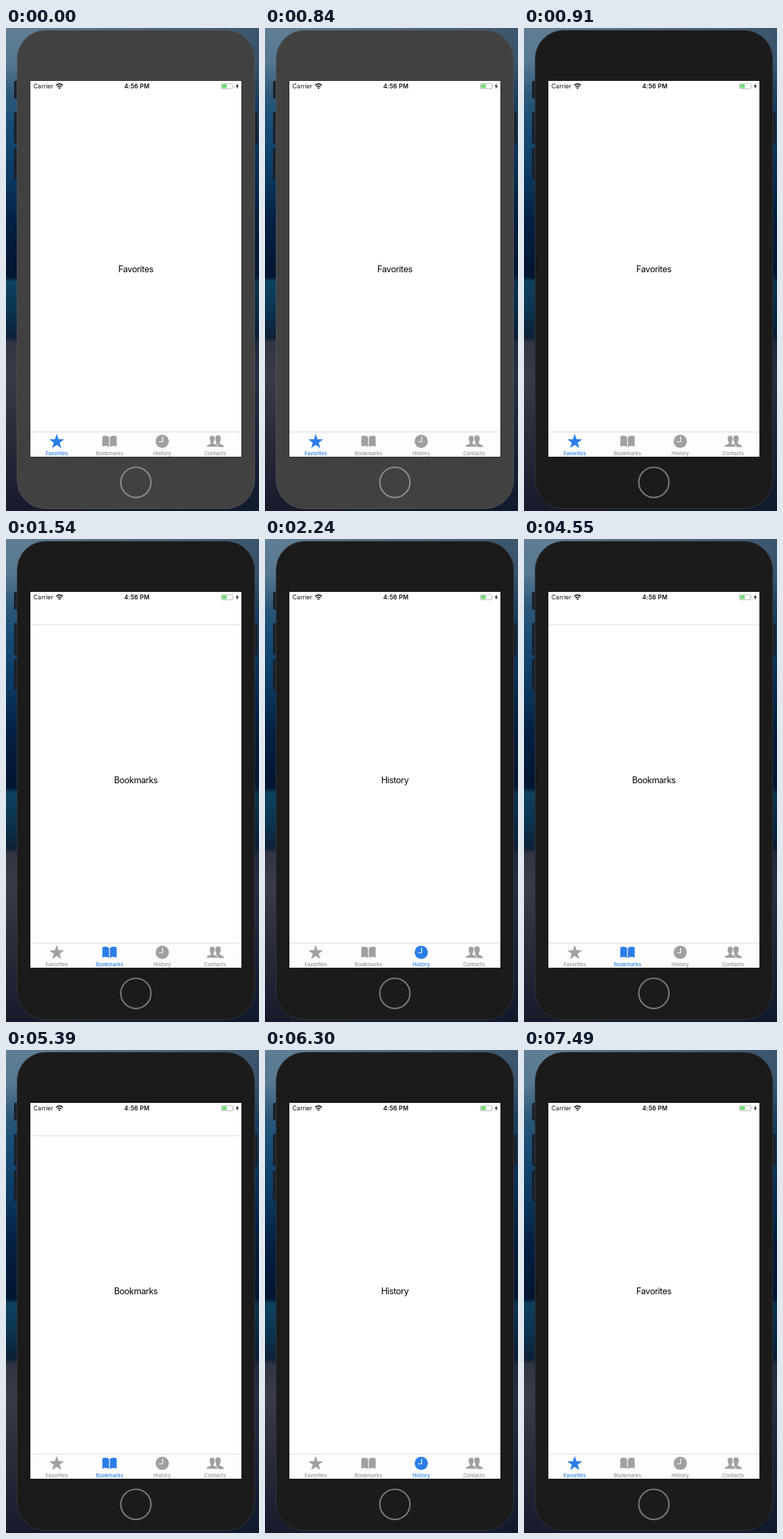
These frames come from a looping animation (374x712 px, 7.56 s). An HTML page:

```html
<!DOCTYPE html>
<html lang="en">
<head>
<meta charset="utf-8">
<title>Tab bar</title>
<style>
  html, body { margin: 0; width: 100%; height: 100%; overflow: hidden; background: #14182a; }
  svg { display: block; width: 100vw; height: 100vh; font-family: Inter, Roboto, sans-serif; }
  .status { font-size: 9px; fill: #111; }
  .label { font-size: 7.5px; font-weight: 500; text-anchor: middle; }
  .title { font-size: 12.8px; letter-spacing: -.38px; text-anchor: middle; fill: #000; }
  .tab { --ink: #a0a0a0; fill: var(--ink); stroke: none; }
  .tab .label { fill: #929292; }
  .tab.on { --ink: #2b7de9; }
  .tab.on .label { fill: #2b7de9; }
</style>
</head>
<body>
<svg viewBox="0 0 374 712" preserveAspectRatio="none">
  <defs>
    <linearGradient id="sea" x2="0" y2="1">
      <stop offset="0" stop-color="#5f7e94"/>
      <stop offset=".07" stop-color="#587891"/>
      <stop offset=".14" stop-color="#2c5878"/>
      <stop offset=".2" stop-color="#174d77"/>
      <stop offset=".3" stop-color="#0b3a63"/>
      <stop offset=".4" stop-color="#051f42"/>
      <stop offset=".515" stop-color="#03152f"/>
      <stop offset=".525" stop-color="#0d425f"/>
      <stop offset=".58" stop-color="#0b3551"/>
      <stop offset=".64" stop-color="#0d2036"/>
      <stop offset=".65" stop-color="#303543"/>
      <stop offset=".72" stop-color="#393b4a"/>
      <stop offset=".85" stop-color="#282b3a"/>
      <stop offset="1" stop-color="#171a2b"/>
    </linearGradient>
    <linearGradient id="shade">
      <stop offset=".1" stop-color="#061a30" stop-opacity="0"/>
      <stop offset="1" stop-color="#061a30" stop-opacity=".4"/>
    </linearGradient>
  </defs>

  <rect width="374" height="712" fill="url(#sea)"/>
  <rect width="374" height="712" fill="url(#shade)"/>

  <g fill="#20242d" stroke="#11151e">
    <rect x="12.5" y="78.5" width="8" height="25" rx="1.5"/>
    <rect x="12.5" y="124.5" width="8" height="46" rx="1.5"/>
    <rect x="12.5" y="177.5" width="8" height="45" rx="1.5"/>
    <rect x="362.5" y="124.5" width="8.5" height="46" rx="1.5"/>
  </g>
  <rect id="body" x="16.5" y="3.5" width="351" height="705" rx="42"/>
  <circle id="home" cx="192" cy="669.8" r="22.3" fill="none" stroke-width="2.2"/>

  <rect x="35.5" y="77.5" width="313" height="555" fill="#161616"/>
  <rect x="36" y="78" width="312" height="554" fill="#fff"/>

  <text class="status" x="40.5" y="89.2">Carrier</text>
  <g fill="none" stroke="#111" stroke-width="1.6">
    <path d="M74.3 84.6Q79.1 80.2 83.9 84.6"/>
    <path d="M76.2 86.8Q79.1 84.2 82 86.8"/>
  </g>
  <path d="M77.4 88.2Q79.1 86.8 80.8 88.2L79.1 90Z" fill="#111"/>
  <text class="status" x="193.5" y="89.2" font-weight="600" text-anchor="middle" letter-spacing=".15">4:56 PM</text>
  <rect x="318.4" y="82" width="17" height="7.6" rx="1.6" fill="#fff" stroke="#a5a5a5" stroke-width=".8"/>
  <rect x="319.4" y="83" width="7" height="5.6" rx=".6" fill="#72dc76"/>
  <path d="M336.4 84.4q1.3 1.4 0 2.8z" fill="#a5a5a5"/>
  <path d="M342.6 81.8L339.6 86.3H341.6L341 89.8L344.2 85.2H342.1Z" fill="#111"/>

  <path id="navLine" d="M36 126.5H348" stroke="#dfdfdf"/>
  <text id="title" class="title" x="192" y="359.7"></text>

  <rect x="36" y="596" width="312" height="36" fill="#fdfdfd"/>
  <path d="M36 595.5H348" stroke="#dcdcdc"/>
  <g id="tabs"></g>
</svg>
<script>
  const LOOP = 7560;
  const FOCUS_AT = 910;
  const $ = id => document.getElementById(id);

  const star = Array.from({ length: 10 }, (_, i) => {
    const r = i % 2 ? 4.2 : 10.6, a = i * Math.PI / 5;
    return `${(r * Math.sin(a)).toFixed(2)},${(1 - r * Math.cos(a)).toFixed(2)}`;
  }).join(' ');

  const person = 'M0-8.4C3-8.4 4.3-6.2 4.1-3.4C4-1 3.3.2 2.5 1.4' +
    'C2.2 3.2 2.6 3.7 4.4 4.4C7 5.3 8.5 5.8 8.7 8.8H-8.7' +
    'C-8.5 5.8-7 5.3-4.4 4.4C-2.6 3.7-2.2 3.2-2.5 1.4' +
    'C-3.3.2-4-1-4.1-3.4C-4.3-6.2-3-8.4 0-8.4Z';

  // Icons are drawn around their own centre.
  const tabs = [
    ['Favorites', `<polygon points="${star}" stroke="var(--ink)" stroke-width=".7" stroke-linejoin="round"/>`],
    ['Bookmarks', `<path d="M-.6-5.8C-2.6-8.7-8-8.6-10.6-6.9V8.4C-7.6 6.6-3.2 6.6-.6 8.7Z
      M.6-5.8C2.6-8.7 8-8.6 10.6-6.9V8.4C7.6 6.6 3.2 6.6 .6 8.7Z"/>`],
    ['History', `<circle cy=".2" r="9.8"/><path d="M.5-6.6V1H-5.2" fill="none" stroke="#fff" stroke-width="1.2"/>`],
    ['Contacts', `<path d="${person}" transform="translate(4.4)"/>
      <path d="${person}" transform="translate(-4.2)" stroke="#fdfdfd" stroke-width=".9"/>`]
  ];

  $('tabs').innerHTML = tabs.map(([name, icon], i) =>
    `<g class="tab" transform="translate(${75 + 78 * i} 609)">${icon}<text class="label" y="20.6">${name}</text></g>`
  ).join('');
  const items = [...$('tabs').children];

  // [time in ms, selected tab]
  const taps = [[0, 0], [1050, 1], [2100, 2], [3150, 3], [4340, 1], [5460, 2], [6790, 0]];

  function draw(ms) {
    const t = ms % LOOP;
    const tab = taps.filter(([at]) => at <= t).pop()[1];
    const focused = t >= FOCUS_AT;
    $('body').setAttribute('fill', focused ? '#1b1b1b' : '#414141');
    $('body').setAttribute('stroke', focused ? '#30343a' : '#50545a');
    $('home').setAttribute('stroke', focused ? '#777' : '#8a8a8a');
    $('title').textContent = tabs[tab][0];
    $('navLine').setAttribute('visibility', tab === 1 ? 'visible' : 'hidden');
    items.forEach((el, i) => el.classList.toggle('on', i === tab));
  }

  const start = performance.now();
  function tick() {
    draw(performance.now() - start);
    requestAnimationFrame(tick);
  }
  tick();
</script>
</body>
</html>
```
